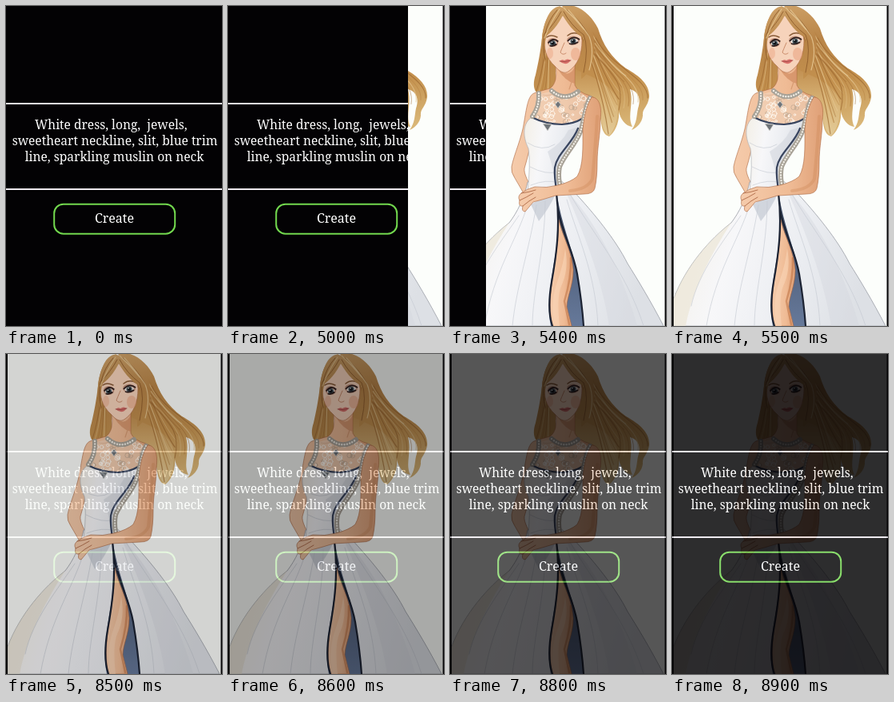
Animation of 270x400 px, one loop 9 s. Source, as an HTML page:

```html
<!DOCTYPE html>
<html lang="en">
<head>
<meta charset="utf-8">
<title>Dress prompt</title>
<style>
  html, body { margin: 0; width: 100%; height: 100%; overflow: hidden; background: #030204; }
  svg { display: block; width: 100%; height: 100%; }
  text { font: 15.55px "Noto Serif", serif; fill: #fff; white-space: pre; }
  .thin { fill: none; stroke-linecap: round; stroke-linejoin: round; }
  .skin { fill: url(#skin); stroke: #a9653f; stroke-width: .6; }
  .trim { stroke: #1c2333; stroke-width: 2.2; }
  .fold { stroke: #c3c8d0; stroke-width: 1; opacity: .6; }
  .jewelBase { stroke: #a8a297; stroke-width: 6; }
  .jewels { stroke: #f1eee6; stroke-width: 2.4; stroke-dasharray: .1 3.3; }
</style>
</head>
<body>
<svg viewBox="0 0 270 400">
  <defs>
    <linearGradient id="hair" gradientUnits="userSpaceOnUse" x1="140" y1="0" x2="175" y2="160">
      <stop offset="0" stop-color="#cda066"/>
      <stop offset=".3" stop-color="#b98548"/>
      <stop offset=".65" stop-color="#c4924f"/>
      <stop offset="1" stop-color="#d9b677"/>
    </linearGradient>
    <linearGradient id="blonde" x1="0" y1="0" x2="0" y2="1">
      <stop offset="0" stop-color="#c18f50"/>
      <stop offset=".5" stop-color="#d8b376"/>
      <stop offset="1" stop-color="#e3cb98"/>
    </linearGradient>
    <linearGradient id="skin" x1="0" y1="0" x2="1" y2="0">
      <stop offset="0" stop-color="#f5cbab"/>
      <stop offset=".6" stop-color="#efbb95"/>
      <stop offset="1" stop-color="#dfa077"/>
    </linearGradient>
    <linearGradient id="satin" x1="0" y1="0" x2="1" y2=".2">
      <stop offset="0" stop-color="#f3efe6"/>
      <stop offset=".35" stop-color="#f7f7f9"/>
      <stop offset=".65" stop-color="#eceef2"/>
      <stop offset="1" stop-color="#dde0e5"/>
    </linearGradient>
    <linearGradient id="lining" x1="0" y1="0" x2="0" y2="1">
      <stop offset="0" stop-color="#3f4b62"/>
      <stop offset="1" stop-color="#66799a"/>
    </linearGradient>
    <clipPath id="wipe"><rect id="reveal" width="270" height="400"/></clipPath>
    <clipPath id="yoke"><path d="M110 111L128 106Q143 118 160 107L174 116L166 142Q148 149 123 146L102 140Z"/></clipPath>
    <path id="collar" d="M127 106Q143 120 160 107"/>
    <path id="leftStrap" d="M111 109Q112 126 103 138"/>
    <path id="rightStrap" d="M175 115C168 128 168 143 163 157C157 173 143 186 137 201Q135 211 137 222"/>
  </defs>

  <g id="card">
    <rect width="270" height="400" fill="#030204"/>
    <path d="M0 122H270M0 229H270" stroke="#ece8ee" stroke-width="1.8"/>
    <text x="36" y="154">White dress, long,  jewels,</text>
    <text x="136" y="174" text-anchor="middle">sweetheart neckline, slit, blue trim</text>
    <text x="135.5" y="194" text-anchor="middle">line, sparkling muslin on neck</text>
    <rect x="60.2" y="247.7" width="151" height="37" rx="11.5" fill="none" stroke="#72d84e" stroke-width="2"/>
    <text x="135.5" y="271" text-anchor="middle" style="font-size:16px">Create</text>
  </g>

  <g id="art" clip-path="url(#wipe)">
    <rect width="270" height="400" fill="#fcfefb"/>

    <!-- hair behind the body -->
    <g fill="url(#hair)">
      <path d="M140 -2C162 -3 177 12 185 28C191 48 201 64 220 78C238 88 250 99 249 114C247 127 240 128 241 137C240 146 234 152 227 155C234 145 233 138 235 128C240 113 233 106 225 104C230 122 221 138 228 151C219 150 213 141 211 132C212 146 206 158 199 163C189 160 190 148 187 136C184 118 174 104 154 101V70Z"/>
      <path d="M138 0C124 4 117 20 115 40C113 58 110 73 107 86C104 95 104 103 108 108L132 106V74L122 50Z"/>
    </g>
    <path d="M155 78C172 87 197 94 207 113C214 129 208 153 199 162C190 157 190 143 186 130L154 106Z" fill="url(#blonde)"/>
    <g id="strands" class="thin"></g>

    <!-- neck, shoulders and left arm -->
    <path class="skin" d="M132 74C134 88 132 98 125 103Q114 106 105 109C98 112 96 125 93 143C90 165 80 185 77 201Q76 208 81 215L92 234L104 231C98 220 92 210 93 203C97 190 100 175 104 160H163L187 130Q185 115 175 112Q160 108 156 99V70Z"/>
    <path d="M134 78Q149 92 156 76V97Q145 95 134 78Z" fill="#cb8459" opacity=".6"/>
    <path class="thin" d="M116 111Q126 113 132 108M149 104L153 92" stroke="#d69a72" stroke-width="1.2"/>

    <!-- skirt -->
    <path d="M97 220C93 240 84 258 74 271C48 291 18 324 2 366V400H267C251 369 234 341 222 322C207 292 180 259 153 230L138 218Z" fill="url(#satin)" stroke="#8f939b" stroke-width=".7"/>
    <path d="M74 271C52 305 27 350 17 400H2V366C18 324 48 291 74 271Z" fill="#ece5d3" opacity=".6"/>
    <path d="M143 228C166 280 190 340 199 400H234C216 334 182 267 143 228Z" fill="#d1d5dc" opacity=".4"/>
    <path d="M101 248Q116 239 132 235Q124 253 111 269Z" fill="#c3c9d3" opacity=".7"/>
    <path class="thin fold" d="M98 246C83 295 55 330 43 400M108 249C98 310 83 350 78 400M119 244C119 304 103 356 103 400M150 235C176 281 221 333 242 400M146 242C160 290 182 334 185 400M86 262C66 292 33 332 24 375"/>

    <!-- slit -->
    <path d="M134 237C138 268 153 303 159 334Q165 372 167 400H126C121 378 125 350 130 320C136 290 135 265 134 237Z" fill="url(#lining)"/>
    <path class="skin" d="M136 267C141 290 152 304 154 330C154 350 146 363 146 376L152 400H128C123 380 126 348 131 321Q136 295 136 267Z"/>
    <path d="M144 303Q149 329 139 350Q133 364 137 400H130Q125 369 135 342Q142 322 144 303Z" fill="#fad6b8" opacity=".6"/>
    <path class="thin" d="M151 315Q152 339 143 369L149 398" stroke="#bd7142" stroke-width="2.5" opacity=".55"/>
    <path class="thin trim" d="M133 234C138 275 133 312 127 345Q121 380 128 400M135 255C141 286 154 306 159 335Q165 371 167 400"/>

    <!-- bodice -->
    <path d="M102 139Q120 147 140 148Q155 147 166 140C165 165 144 181 137 201Q135 212 139 232Q117 239 97 232Q101 198 98 178C93 168 88 149 102 139Z" fill="url(#satin)" stroke="#a5a8af" stroke-width=".6"/>
    <path d="M148 155Q140 171 122 182Q130 203 133 230L138 231Q132 207 143 187Q157 167 162 151Z" fill="#cdd2da" opacity=".5"/>
    <path class="thin fold" d="M97 171Q115 183 131 173M100 201Q121 212 134 207M101 224Q121 216 135 221"/>
    <g clip-path="url(#yoke)">
      <rect x="100" y="100" width="80" height="52" fill="#f0d8c2" opacity=".55"/>
      <g id="lace" class="thin" stroke-width=".8"></g>
    </g>
    <path class="thin trim" d="M102 139Q120 148 140 148Q155 147 165 141M160 153C153 172 134 184 131 202Q130 214 134 235" style="stroke:#39455f"/>
    <g class="thin jewelBase"><use href="#collar"/><use href="#leftStrap"/><use href="#rightStrap"/></g>
    <g class="thin jewels"><use href="#collar"/><use href="#leftStrap"/><use href="#rightStrap"/></g>
    <path d="M135 119l3.5 4-3.5 5-3.5-5ZM116 147l11 1-5 8Z" fill="#6f7479" stroke="#d8d8d3" stroke-width=".8"/>

    <!-- right arm and hands -->
    <path class="skin" d="M177 114C187 114 190 127 188 141C188 161 184 176 184 195Q184 215 181 228Q179 235 168 235L132 237Q116 242 104 245L94 257Q89 257 91 250Q85 251 87 243Q84 238 89 234Q95 229 106 226Q121 228 135 224Q151 220 159 213C167 199 166 177 166 154Q168 128 177 114Z"/>
    <path class="thin" d="M87 243Q96 239 104 234M91 250Q99 243 107 239M89 234Q98 233 107 230" stroke="#a65f3c" stroke-width=".8"/>
    <path class="thin" d="M184 138Q182 175 178 216Q172 229 150 231" stroke="#cc8658" stroke-width="4" opacity=".35"/>

    <!-- face -->
    <path class="skin" d="M119 38C116 53 121 66 131 75C137 82 143 86 149 81C159 74 165 61 165 43C163 25 150 12 140 12C128 12 120 23 119 38Z" style="fill:#f6d3bb"/>
    <ellipse cx="157" cy="60" rx="6" ry="8" fill="#e9a380" opacity=".55"/>
    <ellipse cx="125" cy="59" rx="4" ry="7" fill="#edab8b" opacity=".55"/>
    <g id="eyes"></g>
    <path class="thin" d="M121 39Q126 35 134 39M147 37Q154 31 163 36" stroke="#8a5c38" stroke-width="1.5"/>
    <path class="thin" d="M143 46Q139 55 138 58Q141 62 145 59" stroke="#c58463" stroke-width=".9"/>
    <path d="M137 69Q140 66 143 68Q147 65 151 68Q145 76 137 69Z" fill="#d8706a"/>
    <path class="thin" d="M137 69Q144 71 151 68" stroke="#98443f" stroke-width=".7"/>

    <!-- fringe -->
    <g fill="url(#hair)">
      <path d="M137 5C146 22 156 34 167 40C168 56 164 74 164 91C180 82 187 42 172 15C160 0 145 -3 137 5Z"/>
      <path d="M144 5C138 20 130 30 121 37C117 48 118 60 121 73C111 62 113 26 125 8C131 0 139 -2 144 5Z"/>
    </g>
    <path class="thin" d="M142 7Q151 24 167 36Q174 52 167 83M146 5Q164 18 174 38M139 7Q131 22 118 35Q115 52 119 67M134 5Q123 17 119 34" stroke="#8f5d2c" stroke-width=".9"/>
    <path class="thin" d="M148 5Q162 20 174 38Q181 56 174 80M137 4Q126 20 118 40M142 2Q156 15 167 29" stroke="#e9cb98" stroke-width="1.2" opacity=".8"/>

    <path d="M1 0V400M269.5 0V400" stroke="#030204" stroke-width="2"/>
  </g>
</svg>
<script>
const el = id => document.getElementById(id);
const mix = (a, b, k) => a + (b - a) * k;

function add(parent, tag, attributes) {
  const node = document.createElementNS("http://www.w3.org/2000/svg", tag);
  for (const name in attributes) node.setAttribute(name, attributes[name]);
  el(parent).append(node);
}

// Strands blend from the first curve to the second.
function drawStrands(from, to, count) {
  for (let i = 0; i < count; i++) {
    const p = from.map((v, j) => mix(v, to[j], i / (count - 1)).toFixed(1));
    add("strands", "path", {
      d: `M${p[0]} ${p[1]}C${p.slice(2)}`,
      stroke: ["#9c6730", "#e6c893", "#b47f40"][i % 3],
      "stroke-width": i % 2 ? .7 : 1.1,
      opacity: .7
    });
  }
}
drawStrands([150, 2, 180, 72, 191, 112, 198, 160], [152, 0, 184, 30, 187, 62, 222, 80], 12);
drawStrands([180, 60, 208, 88, 218, 100, 211, 130], [182, 40, 200, 76, 249, 90, 247, 115], 7);
drawStrands([132, 5, 115, 34, 122, 67, 108, 106], [138, 6, 122, 36, 125, 78, 126, 104], 6);

let seed = 7;
const random = () => (seed = seed * 16807 % 2147483647) / 2147483647;
for (let i = 0; i < 75; i++) {
  add("lace", "circle", {
    cx: 104 + random() * 70, cy: 108 + random() * 40, r: 1 + random() * 2.2,
    stroke: i % 3 ? "#fffaf2" : "#c4ab95"
  });
}

function drawEye(x, y, w) {
  add("eyes", "ellipse", { cx: x, cy: y - 1, rx: w + 2, ry: 5.5, fill: "#a8705a", opacity: .6 });
  add("eyes", "ellipse", { cx: x, cy: y, rx: w, ry: 3.4, fill: "#efe6e0" });
  add("eyes", "circle", { cx: x, cy: y, r: 3.5, fill: "#46555c" });
  add("eyes", "circle", { cx: x, cy: y, r: 2, fill: "#11151a" });
  add("eyes", "circle", { cx: x - 1, cy: y - 1.3, r: .8, fill: "#fff" });
  add("eyes", "path", {
    d: `M${x - w - 1} ${y}Q${x} ${y - 8} ${x + w + 2} ${y - 2}M${x - w + 1} ${y + 3}Q${x} ${y + 5} ${x + w} ${y + 1}`,
    fill: "none", stroke: "#2b1c1b", "stroke-width": 1.8
  });
}
drawEye(128.5, 46.5, 4.8);
drawEye(154, 44, 6);

const LOOP = 9000, WIPE = 5000, FADE = 8500, STEP = 100;
const stepsSince = (t, start) => t < start ? 0 : Math.min(6, Math.floor((t - start) / STEP) + 1);
const startTime = performance.now();

function render(now) {
  const t = Math.max(0, now - startTime) % LOOP;
  el("reveal").setAttribute("x", 270 - 45 * stepsSince(t, WIPE));
  el("art").setAttribute("opacity", 1 - stepsSince(t, FADE) / 6);
  requestAnimationFrame(render);
}
render(startTime);
</script>
</body>
</html>
```
